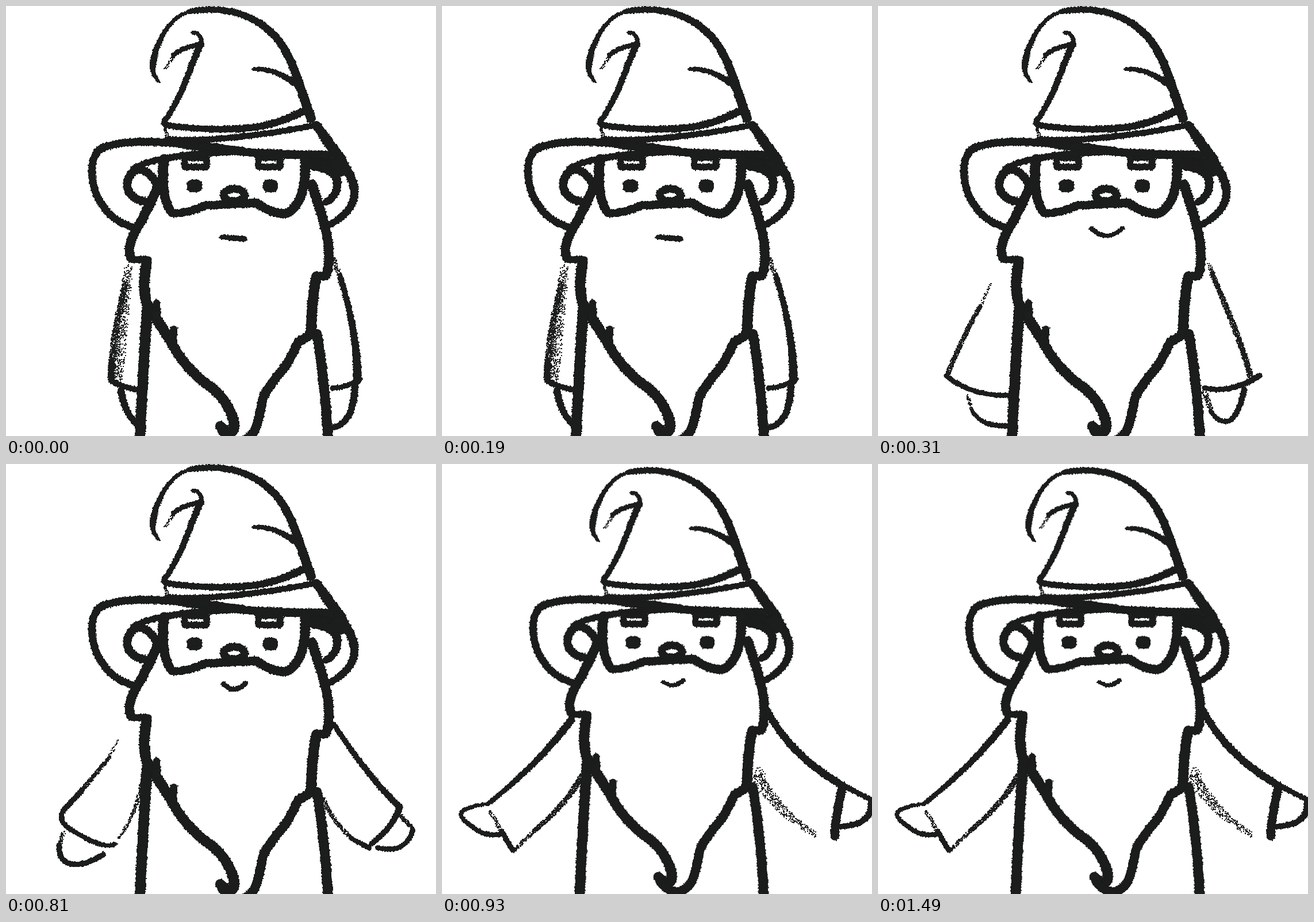
An HTML page with a canvas that plays this animation: 748 by 748 pixels, repeating every 1860 ms.

```html
<!DOCTYPE html>
<html lang="en">
<head>
<meta charset="utf-8">
<title>Wizard shrug</title>
<style>
  html, body { margin: 0; width: 100%; height: 100%; overflow: hidden; background: #fff; }
  canvas { position: absolute; left: 0; top: 0; }
</style>
</head>
<body>
<script>
const SIZE = 748, STEP = 310, LOOP = 1860;
const guide = document.createElementNS("http://www.w3.org/2000/svg", "path");
let ctx, seed;

function random() {
  seed = (seed * 1664525 + 1013904223) >>> 0;
  return seed / 4294967296;
}

// Calls dab(x, y, radius) for each pixel along a curve whose width runs from one value to another.
function walk(curve, from, to, dab) {
  guide.setAttribute("d", curve);
  const length = guide.getTotalLength();
  for (let s = 0; s <= length; s++) {
    const { x, y } = guide.getPointAtLength(s);
    dab(x, y, (from + (to - from) * s / length) / 2);
  }
}

function speck(x, y, r) {
  const angle = random() * Math.PI * 2;
  ctx.fillRect(Math.round(x + r * Math.cos(angle)) - 1, Math.round(y + r * Math.sin(angle)) - 1, 2, 2);
}

// Solid line with a grainy edge
function ink(curve, from, to = from) {
  walk(curve, from, to, (x, y, r) => {
    ctx.beginPath();
    ctx.arc(x, y, r - 0.4, 0, 7);
    ctx.fill();
    for (let i = 0; i < 3; i++) speck(x, y, r - 1 + random() * 1.6);
  });
}

// Chalky line; cover sets how densely the grain falls
function dry(cover, curve, from, to = from) {
  walk(curve, from, to, (x, y, r) => {
    const grains = Math.floor(r / 2 * cover + random());
    for (let i = 0; i < grains; i++) speck(x, y, r * Math.sqrt(random()));
  });
}

function hat() {
  ink("M318 10 C395 -5 460 25 490 85 C508 120 515 155 531 196", 9, 17);
  ink("M313 12 C282 22 258 70 255 105", 5, 11);
  ink("M255 105 Q256 124 267 132", 10, 4);
  ink("M325 47 Q338 44 340 64", 6);
  ink("M340 66 Q312 70 290 86", 8, 7);
  dry(0.8, "M292 86 L277 110", 7, 5);
  ink("M340 66 C322 95 312 150 274 203", 11, 9);
  dry(0.9, "M275 200 L280 228", 8);
  ink("M431 110 Q470 108 507 138", 6, 11);
  ink("M277 207 Q340 216 390 214 C460 213 490 195 525 180", 10, 13);
  ink("M280 232 Q380 238 540 207", 10);
}

function brim() {
  ink("M410 252 C330 242 220 225 168 247 C143 257 143 315 170 350 Q185 373 222 386", 14, 12);
  ink("M300 240 Q400 258 560 260", 12, 16);
  ink("M222 282 Q270 258 390 254", 10, 12);
  ink("M540 207 L584 271", 15, 20);
  ink("M584 271 C612 310 622 350 560 382", 16, 11);
  ink("M522 272 L582 281", 20, 32);
}

function face() {
  ink("M260 305 Q240 278 224 286 C208 298 206 322 222 332 Q230 338 242 340", 14);
  ink("M558 284 C584 292 582 330 555 342", 16, 12);
  ink("M275 266 Q268 330 288 359", 18, 15);
  ink("M288 361 Q320 360 345 347 Q390 345 435 342 Q462 362 488 361 Q522 345 521 266", 13, 17);
  for (const x of [311, 439]) ink(`M${x} 264 v16 h38 v-16 z`, 11);
  for (const x of [328, 460]) ink(`M${x - 5} 310 h10 v6 h-10 z`, 16);
  ink("M415 329 a18 11 0 1 1 -36 0 a18 11 0 1 1 36 0", 13);
}

function beard() {
  ink("M267 310 L235 375 Q206 420 218 438", 17, 16);
  ink("M218 441 H248", 12);
  ink("M245 446 Q236 490 245 518 L286 582", 18);
  ink("M262 516 V538", 12, 15);
  ink("M292 562 L288 584", 13, 18);
  ink("M286 582 Q310 630 355 662 C402 695 412 770 372 730", 17, 18);
  ink("M375 738 Q405 775 431 742 Q442 715 446 685 Q452 668 475 640 Q490 625 508 585 L528 573", 16);
  ink("M532 310 C548 360 572 420 557 468", 17, 16);
  ink("M556 470 H540", 14);
  ink("M540 470 Q530 525 531 572", 18);
}

function robe() {
  ink("M246 525 Q240 600 232 775", 18);
  ink("M541 570 Q558 680 561 775", 17);
}

function armsDown() {
  ink("M375 402 L415 405", 8, 10);
  dry(0.5, "M212 455 Q204 560 194 655", 18);
  dry(2, "M208 480 Q184 580 184 650", 10, 14);
  ink("M183 620 V652 Q205 664 232 668", 10, 9);
  ink("M200 668 Q206 710 233 733", 12, 10);
  dry(1.1, "M570 440 L588 495", 8, 12);
  ink("M581 470 Q612 570 611 652", 8, 15);
  ink("M567 665 Q590 664 617 649", 8);
  ink("M607 660 Q605 725 570 733", 12, 10);
}

function armsLifting() {
  ink("M371 387 Q399 413 427 385", 8, 6);
  dry(0.6, "M195 483 L176 527", 4, 8);
  dry(2.5, "M178 522 Q140 590 121 642", 8, 9);
  ink("M118 643 Q165 680 230 677", 8);
  dry(1.2, "M155 678 L165 705", 5, 8);
  ink("M164 704 Q180 733 227 730", 6, 9);
  dry(0.9, "M576 450 L583 468", 8);
  dry(2.6, "M581 465 Q635 590 648 645", 9, 11);
  ink("M567 664 Q610 676 664 643", 8, 10);
  dry(1.2, "M568 672 L580 705", 10);
  ink("M578 704 Q596 730 614 720 Q630 705 637 666", 7, 10);
}

function armsRising() {
  ink("M378 382 Q397 402 417 381", 8);
  dry(0.6, "M196 480 L176 515", 4, 7);
  dry(2.2, "M180 510 Q160 535 130 570", 7, 9);
  ink("M132 568 L100 602 Q88 622 115 637 Q170 672 190 661", 9, 7);
  dry(1.4, "M239 540 Q228 610 195 652", 8, 5);
  dry(1.3, "M100 640 L94 660", 7);
  ink("M93 662 C88 700 125 708 170 679", 9);
  ink("M570 452 Q630 545 685 597", 8, 11);
  ink("M685 597 Q675 630 635 661", 11, 8);
  dry(1.7, "M550 580 Q575 635 612 658", 8);
  ink("M600 651 L632 668", 6, 9);
  dry(2, "M685 611 L708 635", 8);
  ink("M708 636 Q695 680 645 667", 8);
}

function armsOut() {
  ink("M384 379 Q404 392 421 375", 6, 7);
  ink("M225 445 Q170 520 80 591", 13, 7);
  ink("M80 591 Q10 600 45 625 Q75 652 105 643", 5, 9);
  dry(1.3, "M83 603 L105 642", 6, 8);
  ink("M103 638 L123 672", 8, 9);
  dry(1.4, "M124 673 L162 637", 7);
  dry(2.6, "M160 638 Q215 595 245 540", 8, 11);
  ink("M565 428 Q605 505 690 555", 12, 13);
  ink("M690 555 L746 584", 9, 8);
  ink("M746 584 C750 620 725 630 685 631", 11, 9);
  ink("M697 560 Q685 610 683 648", 15);
  dry(0.6, "M546 535 Q575 600 650 645", 26, 10);
}

const frames = [armsDown, armsLifting, armsRising, armsOut].map(arms => {
  const canvas = document.createElement("canvas");
  canvas.width = canvas.height = SIZE;
  ctx = canvas.getContext("2d");
  ctx.fillStyle = "#1c1e1d";
  seed = 7;
  // The body leans back a little once the arms are out.
  if (arms === armsOut) ctx.setTransform(0.976, 0, 0, 0.976, 12.5, 5);
  for (const part of [hat, brim, face, beard, robe]) part();
  ctx.resetTransform();
  arms();
  document.body.append(canvas);
  return canvas;
});

function show() {
  const current = Math.min(3, Math.floor(performance.now() % LOOP / STEP));
  frames.forEach((canvas, i) => canvas.hidden = i !== current);
  requestAnimationFrame(show);
}
show();
</script>
</body>
</html>
```
